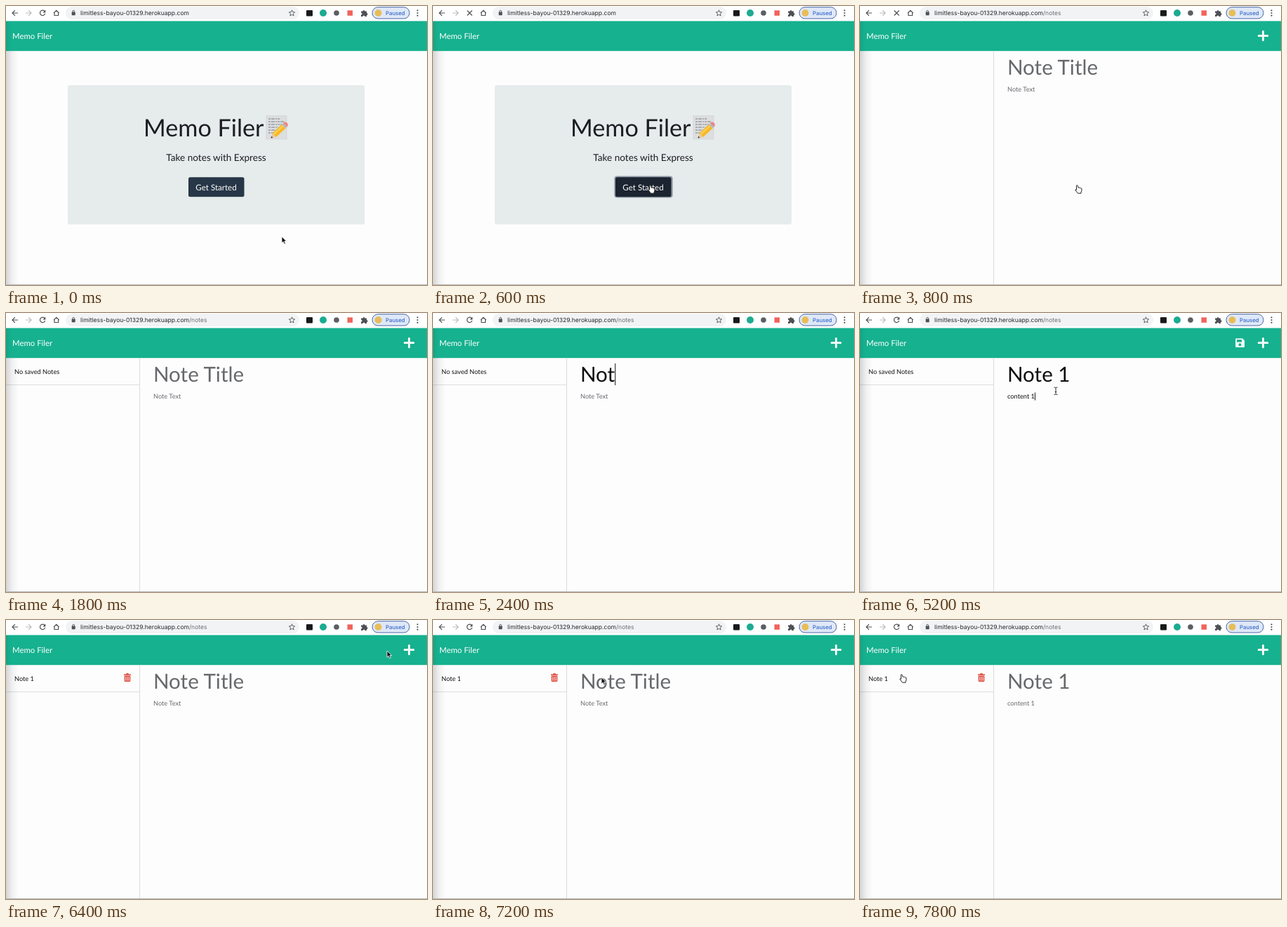
Recreate the animation shown at these times as an HTML page. Size 600 by 398 pixels, loop 8 s.

```html
<!DOCTYPE html>
<html lang="en">
<head>
<meta charset="utf-8">
<title>Memo Filer</title>
<style>
  html, body { margin: 0; width: 100%; height: 100%; overflow: hidden; background: #fdfdfe; }
  svg { display: block; width: 600px; height: 398px; }
  text { font-family: Lato, sans-serif; font-size: 9.24px; white-space: pre; text-rendering: geometricPrecision; }
  .ui { font-family: Inter, sans-serif; font-size: 8.55px; }
  .line { fill: none; stroke: #4d5054; stroke-width: 1.2; }
  .brand { font-size: 11.4px; fill: #fff; }
  .mid { text-anchor: middle; }
</style>
</head>
<body>
<svg viewBox="0 0 600 398">
  <defs>
    <linearGradient id="shade">
      <stop offset="0" stop-color="#000" stop-opacity=".16"/>
      <stop offset=".5" stop-color="#000" stop-opacity=".05"/>
      <stop offset="1" stop-color="#000" stop-opacity="0"/>
    </linearGradient>
  </defs>
  <rect width="600" height="398" fill="#fdfdfe"/>

  <g id="toolbar">
    <rect width="600" height="22" fill="#fff"/>
    <path class="line" d="M17 10H9M12.8 6.2L9 10l3.8 3.8"/>
    <path class="line" style="stroke:#b9bbbe" d="M28 10h8M32.2 6.2L36 10l-3.8 3.8"/>
    <g id="reload">
      <path class="line" d="M55 7.4A3.7 3.7 0 1 0 55.7 11"/>
      <path fill="#4d5054" d="M56.3 5.6v3.8h-3.8z"/>
    </g>
    <path id="stop" class="line" d="M48.7 6.5l7 7M55.7 6.5l-7 7"/>
    <path class="line" d="M68 10l3.8-3.6L75.600 10M69 9.500v4h5.600v-4"/>
    <rect x="85" y="1" width="333" height="18" rx="9" fill="#f1f3f4"/>
    <rect x="93.700" y="8.600" width="5" height="4.600" rx=".6" fill="#4d5054"/>
    <path class="line" style="stroke-width:.9" d="M94.800 9V7.700a1.400 1.400 0 0 1 2.800 0V9"/>
    <text class="ui" x="106" y="13" fill="#25282b">limitless-bayou-01329.herokuapp.com<tspan id="path" fill="#6b6f73">/notes</tspan></text>
    <path class="line" style="stroke-width:.9" d="M407.500 5.800l1.200 2.800 3 .3-2.300 2 .7 3-2.600-1.600-2.600 1.600.7-3-2.300-2 3-.3z"/>
    <rect x="428" y="6" width="9" height="8.500" rx="1" fill="#17191b"/>
    <circle cx="452" cy="10" r="5" fill="#1bab92"/>
    <circle cx="471" cy="10" r="3.800" fill="#5b5e62"/>
    <rect x="486.500" y="6.300" width="7.500" height="7.500" fill="#f0645c"/>
    <path fill="#4d5054" d="M506 7.500h2.500a1.500 1.500 0 1 1 3 0h2.500v2.500a1.500 1.500 0 1 1 0 3v2h-2.500a1.500 1.500 0 0 0-3 0H506v-2.500a1.500 1.500 0 0 0 0-3z"/>
    <rect x="522" y="1.700" width="53" height="16.300" rx="8.100" fill="#dfe8f8" stroke="#4868a6"/>
    <circle cx="530.500" cy="10" r="5" fill="#e8bd58"/>
    <text class="ui" x="541" y="13" fill="#3567c8" style="font-size:7.800px;font-weight:500">Paused</text>
    <g fill="#4d5054"><circle cx="586.500" cy="6.300" r="1.100"/><circle cx="586.500" cy="10" r="1.100"/><circle cx="586.500" cy="13.700" r="1.100"/></g>
  </g>

  <rect y="21.500" width="600" height="42.700" fill="#16b18f"/>
  <text class="brand" x="9" y="47">Memo Filer</text>

  <g id="home">
    <rect x="88" y="113" width="423" height="198.500" rx="3" fill="#e6ebeb"/>
    <text x="196" y="186" fill="#1b1d22" style="font-size:34.200px">Memo Filer</text>
    <g id="memo">
      <rect x="371" y="156.500" width="29" height="33.500" fill="#dcdedf" stroke="#cdd0d1" stroke-width=".6"/>
      <path d="M374 161h17M374 165h22M374 169h19M374 173h14M374 177h11M374 181h7" stroke="#777b80" stroke-width="1.100" stroke-dasharray="3 1 5 1.200 2 1"/>
      <path d="M377.500 188.500l2-7 5.500 5.500z" fill="#e9c9a0"/>
      <path d="M377.500 188.500l.8-2.700 2 1.900z" fill="#333"/>
      <path d="M379.500 181.500L393 169l5.500 5.500L385 187z" fill="#f7b928"/>
      <path d="M381.400 183.300L394.800 171" stroke="#ffd967" stroke-width="1.500"/>
      <path d="M393 169l2-1.900 5.500 5.500-2 1.900z" fill="#b5b9bd"/>
      <path d="M395 167.100l1.500-1.300q2-1 4 1t1 4l-1 1.800z" fill="#ee8580"/>
    </g>
    <text class="mid" x="299.500" y="221" fill="#1b1d22" style="font-size:13.600px">Take notes with Express</text>
    <rect id="ring" x="258.300" y="242.500" width="83.400" height="31" rx="4" fill="#8f9ba6"/>
    <rect id="button" x="260" y="244.300" width="79.500" height="28" rx="2.500"/>
    <text class="mid brand" x="299.500" y="262.500" style="font-size:11.550px">Get Started</text>
  </g>

  <g id="notes">
    <path d="M190.500 64V397" stroke="#d9dbde"/>
    <g id="list">
      <path d="M0 102.500H190" stroke="#dcdee0"/>
      <text id="item" x="12" y="87" fill="#111"></text>
    </g>
    <path id="trash" fill="#e04a3c" fill-rule="evenodd" d="M168 77.300h3l.7-1.300h2.600l.7 1.300h3v1.500h-10zM168.700 79.600h8.600v7.200q0 1.200-1.200 1.200h-6.200q-1.200 0-1.200-1.200zM170.300 81v5.700h.9V81zM172.600 81v5.700h.9V81zM174.900 81v5.700h.9V81z"/>
    <path id="save" fill="#f1fbf8" fill-rule="evenodd" d="M536.400 36.300h8.700l3 3v8.400q0 1.300-1.300 1.300h-10.400q-1.300 0-1.300-1.300V37.600q0-1.300 1.300-1.300zM537 38v3.500h7V38zM541.500 43.300a2 2 0 1 0 .01 0z"/>
    <path d="M574.500 36.200v12.600M568.200 42.500h12.600" stroke="#f1fbf8" stroke-width="3" stroke-linecap="round"/>
    <text id="title" x="210" y="98" style="font-size:29.570px"></text>
    <text id="body" x="210" y="122"></text>
    <rect id="caret" width="1" fill="#111"/>
  </g>

  <rect y="64" width="18" height="334" fill="url(#shade)"/>
  <rect y="22" width="9" height="42" fill="url(#shade)" opacity=".5"/>
  <path d="M0 397.500H600" stroke="#b5b7b9"/>

  <g id="arrow"><path d="M0 0v9.200l2.200-2 1.500 3.500 1.700-.7-1.500-3.400h3z" fill="#111" stroke="#fff" stroke-width=".8"/></g>
  <g id="hand"><path d="M-2.500-5q1.400-.9 1.800.5l.8 2.700q1-.8 1.700.3 1-.7 1.600.4 1.300-.4 1.500 1l.1 2.300-1 2.700v1.300h-4.500q-1.700-2.200-3.600-4.500-.4-1.500 1.700-.5z" fill="#fff" stroke="#222" stroke-width="1"/></g>
  <g id="beam"><path d="M-2.500-5q2 0 2.500 1 .5-1 2.500-1M-2.500 5.500q2 0 2.500-1 .5 1 2.500 1M0-4v8.500M-1.200 1.500h2.400" fill="none" stroke="#333" stroke-width="1"/></g>
</svg>
<script>
const LOOP = 8000, STEP = 200;
const $ = id => document.getElementById(id);
const show = (id, on) => $(id).style.display = on ? '' : 'none';
const last = (keys, t) => keys.findLast(key => key[0] <= t);

// [time, text typed so far]
const titleKeys = [[0, ''], [2000, 'N'], [2200, 'No'], [2400, 'Not'], [2600, 'Note'], [2800, 'Note '], [3000, 'Note 1'], [6200, ''], [7800, 'Note 1']];
const bodyKeys = [[0, ''], [4400, 'c'], [4600, 'cont'], [4800, 'conten'], [5000, 'content '], [5200, 'content 1'], [6200, ''], [7800, 'content 1']];
const itemKeys = [[0, ''], [1000, 'No saved Notes'], [6200, 'Note 1']];
const pointerKeys = [[0, 'arrow'], [400, 'hand'], [1000, 'beam'], [1800, ''], [3400, 'beam'], [4400, ''], [5200, 'beam'], [5600, 'arrow'], [5800, 'hand'], [6400, 'arrow'], [7000, 'arrow'], [7400, 'hand']];
// [time, x, y]
const pathKeys = [[0, 393, 329], [200, 372, 310], [400, 316, 266], [600, 311, 261], [800, 311, 261], [1000, 292, 190], [1200, 252, 109],
  [1400, 248, 94], [3400, 248, 94], [3800, 279, 111], [5200, 279, 111], [5400, 300, 104], [5600, 450, 66], [5800, 540, 44],
  [6400, 543, 44], [6600, 541, 46], [6800, 526, 52], [7000, 430, 66], [7200, 240, 82], [7400, 80, 87], [7600, 61, 83], [LOOP, 61, 83]];

function pointerAt(t) {
  const i = pathKeys.findLastIndex(key => key[0] <= t);
  const [t0, x0, y0] = pathKeys[i], [t1, x1, y1] = pathKeys[i + 1];
  const k = (t - t0) / (t1 - t0);
  return [x0 + (x1 - x0) * k, y0 + (y1 - y0) * k];
}

function fillField(id, text, placeholder, editable) {
  $(id).textContent = text || placeholder;
  $(id).setAttribute('fill', text && editable ? '#0c0c0d' : '#66686b');
}

function placeCaret(id, text, y, height) {
  const x = 210 + (text ? $(id).getComputedTextLength() : 0);
  for (const [name, value] of Object.entries({ x, y, height })) $('caret').setAttribute(name, value);
}

function draw(t) {
  const onNotes = t >= 800, loading = t === 600 || t === 800;
  const title = last(titleKeys, t)[1], body = last(bodyKeys, t)[1];
  show('home', !onNotes);
  show('notes', onNotes);
  show('path', onNotes);
  show('reload', !loading);
  show('stop', loading);
  show('ring', t === 600);
  $('button').setAttribute('fill', t >= 400 ? '#1b2430' : '#273747');

  $('item').textContent = last(itemKeys, t)[1];
  show('list', t >= 1000);
  show('trash', t >= 6200);
  show('save', t >= 4400 && t < 6200);
  fillField('title', title, 'Note Title', t < 6200);
  fillField('body', body, 'Note Text', t < 6200);

  show('caret', t >= 1400 && t < 5800 && t !== 1800 && t !== 4200);
  if (t < 3800) placeCaret('title', title, 72, 31);
  else placeCaret('body', body, 113.5, 11);

  const shape = last(pointerKeys, t)[1], [x, y] = pointerAt(t);
  for (const id of ['arrow', 'hand', 'beam']) {
    show(id, id === shape);
    $(id).setAttribute('transform', `translate(${x} ${y})`);
  }
}

const start = performance.now();
function tick() {
  const t = (performance.now() - start) % LOOP;
  draw(Math.floor(t / STEP) * STEP);
  requestAnimationFrame(tick);
}
tick();
</script>
</body>
</html>
```
